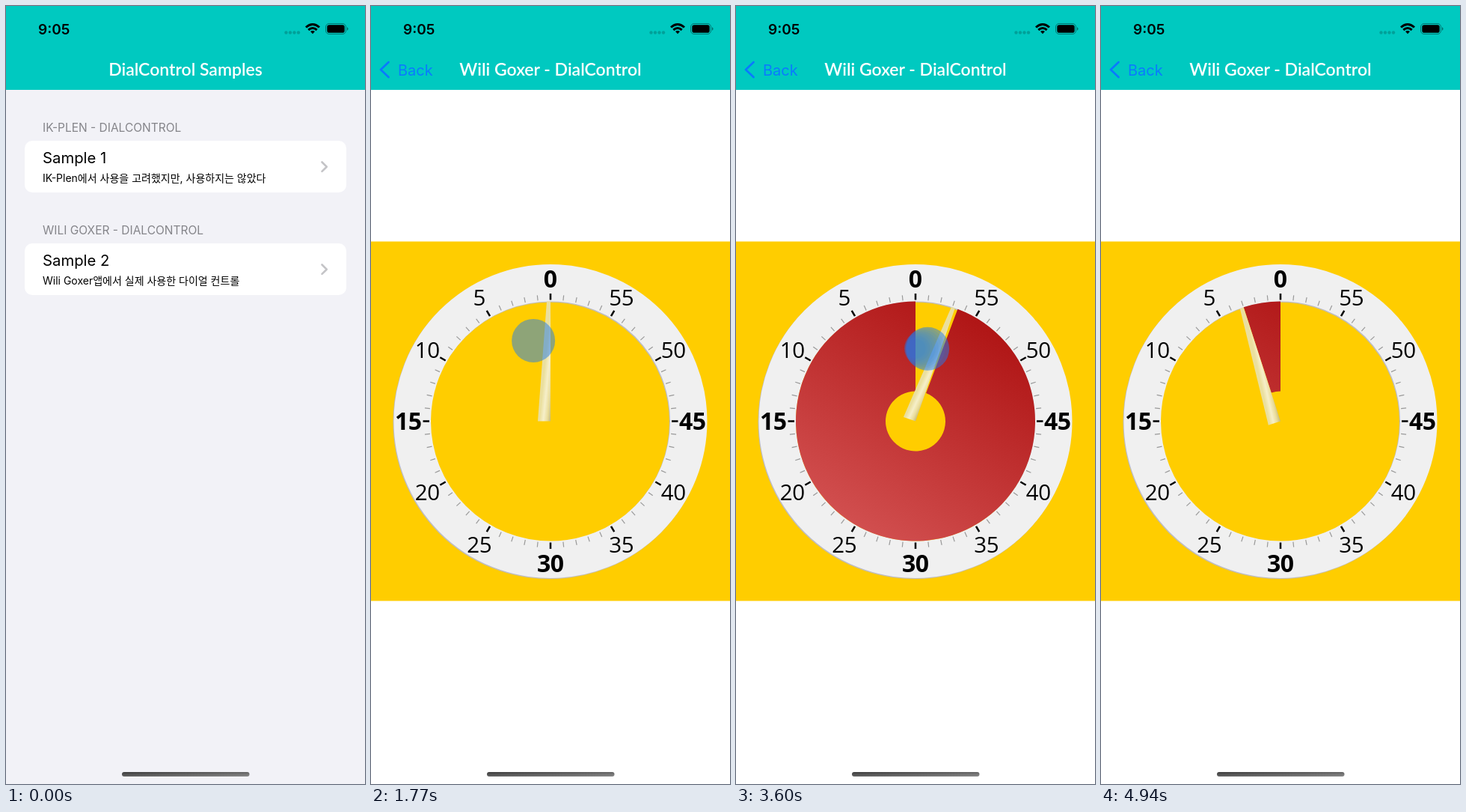
These frames come from a looping animation (480x1039 px, 4.98 s). An HTML page:

```html
<!DOCTYPE html>
<html lang="ko">
<head>
<meta charset="utf-8">
<title>DialControl Samples</title>
<style>
  html, body { margin: 0; width: 100%; height: 100%; overflow: hidden; background: #fff; }
  svg { display: block; width: 100vw; height: 100vh; }
  text { font-family: Inter, "Noto Sans CJK KR", "Noto Sans CJK", sans-serif; }
  .nav { font: 600 23px Lato, sans-serif; fill: #fff; text-anchor: middle; }
  .section { font-size: 15.5px; fill: #85858a; }
  .name { font-size: 20.3px; }
  .note { font-size: 14px; }
  .num { font: 400 29.5px "Open Sans", Roboto, sans-serif; font-stretch: condensed; letter-spacing: -.5px; text-anchor: middle; }
  .num.bold { font-weight: 700; font-size: 32px; }
  .line { fill: none; stroke-linecap: round; stroke-linejoin: round; }
</style>
</head>
<body>
<svg viewBox="0 0 480 1039" preserveAspectRatio="none">
  <defs>
    <linearGradient id="red" gradientUnits="userSpaceOnUse" x1="360" y1="385" x2="160" y2="715">
      <stop stop-color="#ab0d0d"/><stop offset="1" stop-color="#d35252"/>
    </linearGradient>
    <linearGradient id="wood" gradientUnits="userSpaceOnUse" x1="-15" y1="0" x2="0" y2="1.5">
      <stop stop-color="#eadf9e"/><stop offset=".35" stop-color="#f6efc9"/>
      <stop offset=".7" stop-color="#e9dc9a"/><stop offset="1" stop-color="#c4b87a"/>
    </linearGradient>
    <linearGradient id="bar" x2="1" y2="1">
      <stop stop-color="#3c3c3c"/><stop offset="1" stop-color="#8a8a8a"/>
    </linearGradient>
    <filter id="shadow" x="-20%" y="-20%" width="140%" height="140%" color-interpolation-filters="sRGB">
      <feDropShadow dx="-1" dy="1.2" stdDeviation=".7" flood-color="#bcbcc8"/>
    </filter>
  </defs>

  <g id="list"></g>
  <rect id="dim" y="112" width="480" height="927"/>

  <g id="detail">
    <rect y="112" width="480" height="927" fill="#fff"/>
    <rect y="314.500" width="480" height="480" fill="#ffcd00"/>
    <circle cx="240" cy="554.500" r="184.750" fill="none" stroke="#f0f0f0" stroke-width="49.500" filter="url(#shadow)"/>
    <g id="marks"></g>
    <path id="wedge" fill="url(#red)"/>
    <path id="hand" d="M-5-160H0V0H-17Z" fill="url(#wood)"/>
    <g id="touches" fill="#1e7cf0"></g>
  </g>

  <rect width="480" height="112" fill="#00c9c0"/>
  <text id="listTitle" class="nav" y="92.500">DialControl Samples</text>
  <text id="detailTitle" class="nav" y="92.500">Wili Goxer - DialControl</text>
  <g id="back" fill="#0a7aff">
    <path class="line" d="M23.500 75L13 85L23.500 95" stroke="#0a7aff" stroke-width="2.800"/>
    <text id="backLabel" y="92.500" font-size="20">Back</text>
  </g>

  <text x="43" y="37.500" font-size="19" font-weight="600">9:05</text>
  <g fill="#000" fill-opacity=".2">
    <circle cx="374.500" cy="35.500" r="2.200"/><circle cx="380" cy="35.500" r="2.200"/>
    <circle cx="385.500" cy="35.500" r="2.200"/><circle cx="391" cy="35.500" r="2.200"/>
  </g>
  <g fill="none" stroke="#000" stroke-width="3">
    <path d="M401 28.500Q410 20.500 419 28.500M404.300 32Q410 27 415.700 32"/>
    <path d="M407 34Q410 31.800 413 34L410 37.300Z" fill="#000" stroke="none"/>
  </g>
  <rect x="427.500" y="23.500" width="27" height="14" rx="4.500" fill="none" stroke="#000" stroke-opacity=".4"/>
  <rect x="429.300" y="25.300" width="23.400" height="10.400" rx="2.800"/>
  <path d="M456 28Q459 30.500 456 33Z" fill-opacity=".5"/>
  <rect x="155" y="1023" width="170.500" height="6" rx="3" fill="url(#bar)"/>
</svg>

<script>
const LOOP = 4980, PUSH_START = 951.5, TOUCH_START = 1770, TOUCH_END = 4790;
const CX = 240, CY = 554.5;
const $ = id => document.getElementById(id);
const clamp = x => Math.max(0, Math.min(1, x));

// Point on the dial, angle counted counter-clockwise from the top.
function polar(angle, radius) {
  const a = angle * Math.PI / 180;
  return [CX - radius * Math.sin(a), CY - radius * Math.cos(a)];
}

// Smooth curve through [time, value] keys without overshoot.
function curve(keys) {
  const slope = i => (keys[i + 1][1] - keys[i][1]) / (keys[i + 1][0] - keys[i][0]);
  const tangent = keys.map((_, i) => {
    if (!i || i === keys.length - 1) return 0;
    const a = slope(i - 1), b = slope(i);
    return a * b > 0 ? 2 * a * b / (a + b) : 0;
  });
  return t => {
    if (t <= keys[0][0]) return keys[0][1];
    const i = keys.findIndex(k => k[0] > t) - 1;
    if (i < 0) return keys[keys.length - 1][1];
    const [t0, v0] = keys[i], [t1, v1] = keys[i + 1];
    const d = t1 - t0, u = (t - t0) / d, w = 1 - u;
    return v0 * (1 + 2 * u) * w * w + v1 * u * u * (3 - 2 * u)
      + d * u * w * (tangent[i] * w - tangent[i + 1] * u);
  };
}

const handAngle = curve([[1800, 0], [2350, 138], [2930, 280], [3430, 348], [3600, 340.8],
  [4270, 91.3], [4500, 38], [4810, 18]]);
const touchRadius = curve([[1770, 110], [2350, 130], [2780, 107], [2930, 77], [3430, 97],
  [3600, 98], [4100, 188], [4270, 176], [4810, 150]]);

function listRow(y, section, name, note, id) {
  return `<text class="section" x="49" y="${y - 12}">${section}</text>
    <rect id="${id}" x="25" y="${y}" width="430" height="69" rx="10" fill="#fff"/>
    <text class="name" x="49" y="${y + 30}">${name}</text>
    <text class="note" x="49" y="${y + 55}">${note}</text>
    <path class="line" d="M422.500 ${y + 28.5}l6.300 6.200l-6.300 6.200" stroke="#c4c4c7" stroke-width="2.600"/>`;
}

$('list').innerHTML = '<rect y="112" width="700" height="927" fill="#f2f2f7"/>'
  + listRow(180, 'IK-PLEN - DIALCONTROL', 'Sample 1', 'IK-Plen에서 사용을 고려했지만, 사용하지는 않았다', 'row1')
  + listRow(317, 'WILI GOXER - DIALCONTROL', 'Sample 2', 'Wili Goxer앱에서 실제 사용한 다이얼 컨트롤', 'row2');

let marks = '';
for (let minute = 0; minute < 60; minute++) {
  const major = minute % 5 === 0, angle = minute * 6;
  const [x1, y1] = polar(angle, 162), [x2, y2] = polar(angle, major ? 170.5 : 169);
  marks += `<path d="M${x1} ${y1}L${x2} ${y2}" stroke="${major ? '#000' : '#999'}" stroke-width="${major ? 2.5 : 1.2}"/>`;
  if (major) {
    const [x, y] = polar(angle, 190), bold = minute % 15 === 0;
    marks += `<text class="num${bold ? ' bold' : ''}" x="${x - .3}" y="${y + (bold ? 11.5 : 10.5)}">${minute}</text>`;
  }
}
$('marks').innerHTML = marks;

function wedgePath(angle) {
  if (angle < .1) return '';
  const large = +(angle > 180);
  return `M${polar(0, 40)}L${polar(0, 160)}A160 160 0 ${large} 0 ${polar(angle, 160)}
    L${polar(angle, 40)}A40 40 0 ${large} 1 ${polar(0, 40)}Z`;
}

function touchCircle(t, radius, opacity) {
  const [x, y] = polar(handAngle(t + 22) + 12, touchRadius(t));
  return `<circle cx="${x}" cy="${y}" r="${radius}" opacity="${opacity}"/>`;
}

function touchTrail(t) {
  const fade = clamp(1 - (t - TOUCH_END) / 110);
  let circles = '';
  for (let k = 8; k > 0; k--) {
    const past = t - k * 20;
    if (past >= TOUCH_START && past <= TOUCH_END) circles += touchCircle(past, 29 - k * 2, fade * (.13 - k * .008));
  }
  if (t >= TOUCH_START) circles += touchCircle(t, 29, .5 * fade);
  return circles;
}

function render(t) {
  // Critically damped spring for the page push.
  const s = Math.max(0, t - PUSH_START) * .0183;
  const push = t > 1570 ? 1 : 1 - (1 + s) * Math.exp(-s), rest = 1 - push;
  $('list').setAttribute('transform', `translate(${-144 * push})`);
  $('dim').setAttribute('opacity', .1 * push);
  $('row2').setAttribute('fill', t < 900 ? '#fff' : '#d1d1d6');
  $('detail').setAttribute('transform', `translate(${480 * rest})`);

  $('listTitle').setAttribute('x', 240 - 180 * push);
  $('listTitle').setAttribute('opacity', clamp(1 - 1.5 * push));
  $('detailTitle').setAttribute('x', 240 + 360 * rest);
  $('detailTitle').setAttribute('opacity', clamp(1 - 2 * rest));
  $('back').setAttribute('opacity', clamp(1 - 1.5 * rest));
  $('backLabel').setAttribute('x', 36 + 110 * rest);

  const angle = handAngle(t);
  $('wedge').setAttribute('d', wedgePath(angle * .996));
  $('hand').setAttribute('transform', `translate(${CX} ${CY}) rotate(${-angle})`);
  $('touches').innerHTML = touchTrail(t);
}

function tick() {
  render(performance.now() % LOOP);
  requestAnimationFrame(tick);
}
tick();
</script>
</body>
</html>
```
